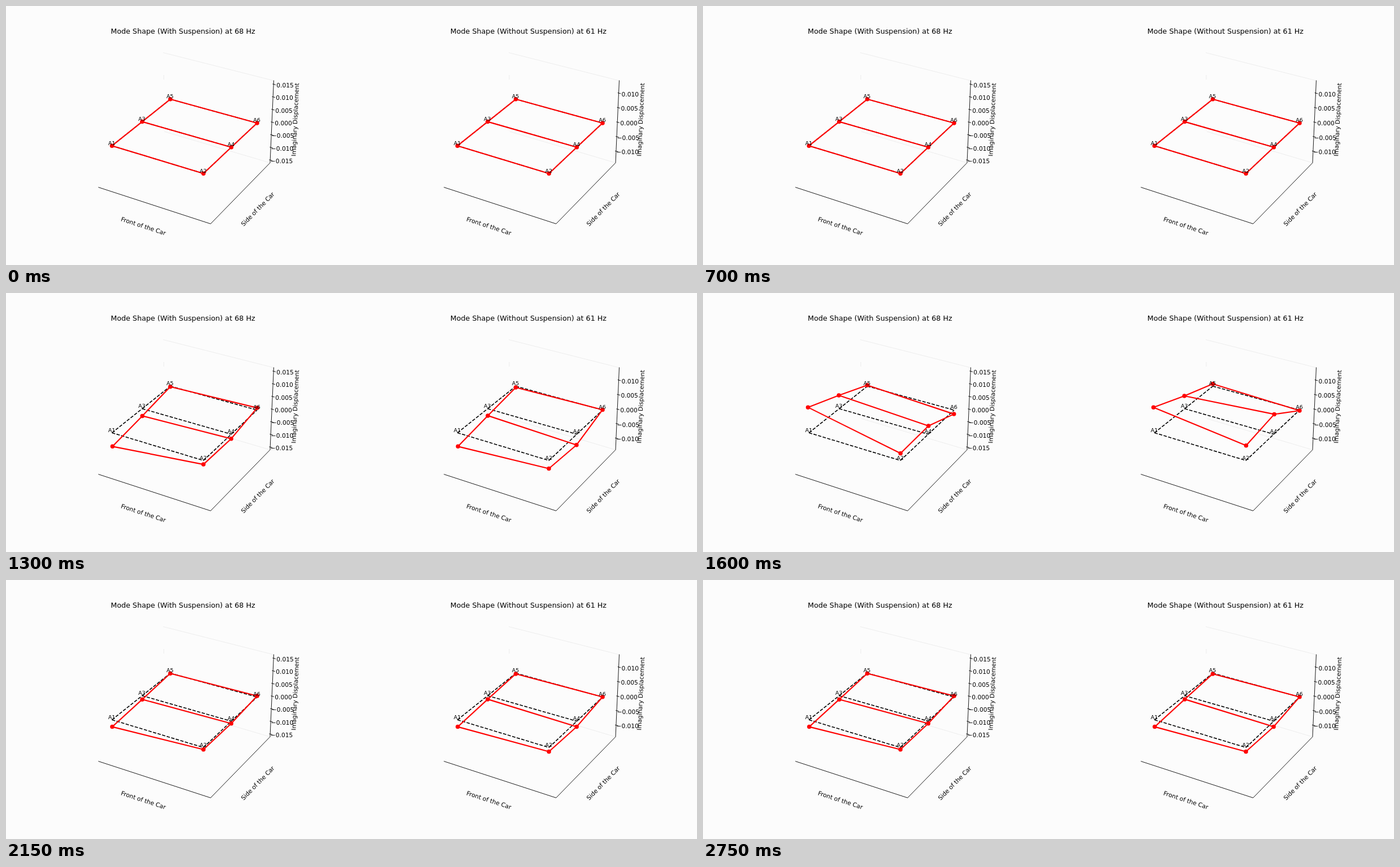
An HTML page for the animation above (2800 ms loop, 1222 by 458 pixels).

```html
<!DOCTYPE html>
<html lang="en">
<head>
<meta charset="utf-8">
<title>Mode shapes</title>
<style>
  html, body { margin: 0; width: 100%; height: 100%; overflow: hidden; background: #fcfcfc; }
  svg { display: block; width: 1222px; height: 458px; }
  text { font-family: "DejaVu Sans", sans-serif; font-size: 10.61px; text-anchor: middle; }
  .title { font-size: 12.73px; }
  .name { font-size: 9.55px; }
  .axis { fill: none; stroke: #000; stroke-width: .9; }
  .pane { fill: none; stroke: #ebebeb; stroke-width: .9; }
  .rest { stroke: #000; stroke-width: 1.6; stroke-dasharray: 5.88 2.54; }
  .shape { fill: none; stroke: #f00; stroke-width: 2.15; stroke-linejoin: round; }
  .dot { fill: #f00; }
</style>
</head>
<body>
<svg id="stage" viewBox="0 0 1222 458"></svg>
<script>
const FRAME_MS = 50, CYCLE = 28;
const VANISH = [317, 3600];
const REST = [[187.4, 247.2], [349.2, 296.2], [240.8, 204.6], [398.4, 249.7], [290.5, 164.8], [444, 207]];
const EDGES = [[0, 1], [2, 3], [4, 5], [0, 2], [2, 4], [1, 3], [3, 5]];
const ROUTE = [0, 1, 3, 2, 0, 2, 4, 5, 3];

// amp: peak rise of each point in pixels
const PANELS = [
  { x: 0, title: "Mode Shape (With Suspension) at 68 Hz", ticks: 3, step: 22.35,
    amp: [59.8, 17, 31.6, 19.8, 2.3, -9.6] },
  { x: 611, title: "Mode Shape (Without Suspension) at 61 Hz", ticks: 2, step: 25.7,
    amp: [59.8, 35.4, 30.3, 47, 5.4, -1.3] }
];

function add(parent, tag, attrs, text) {
  const el = document.createElementNS("http://www.w3.org/2000/svg", tag);
  for (const key in attrs) el.setAttribute(key, attrs[key]);
  if (text) el.textContent = text;
  parent.appendChild(el);
  return el;
}

function label(parent, text, x, y, angle, drop) {
  add(parent, "text", { transform: `translate(${x} ${y}) rotate(${angle})`, y: drop }, text);
}

function drawTicks(g, panel) {
  for (let i = -panel.ticks; i <= panel.ticks; i++) {
    const y = 207 - i * panel.step;
    const axisY = y - 1.6;
    const axisX = 473.5 - (axisY - 132) * 0.0448;
    add(g, "path", { class: "axis", d: `M${axisX - 1.8} ${axisY - 0.5}L${axisX + 3.8} ${axisY + 1}` });
    const value = (i < 0 ? "\u2212" : "") + Math.abs(i * 0.005).toFixed(3);
    label(g, value, 490.5 + (207 - y) * 0.0448, y, 0, 3.9);
  }
}

function build(panel) {
  const g = add(document.getElementById("stage"), "g", { transform: `translate(${panel.x} 0)` });
  add(g, "path", { class: "pane", d: "M278 82.5L473.5 132M279 122V130M279.8 222L467 277.3" });
  add(g, "path", { class: "axis", d: "M163.3 320.5L361.8 385.2L467 277.3L473.5 131.5" });
  drawTicks(g, panel);
  label(g, "Front of the Car", 243, 389, 18, 3.9);
  label(g, "Side of the Car", 445, 359, -45.6, 3.9);
  label(g, "Imaginary Displacement", 512.3, 201, -87.4, 2.9);
  add(g, "text", { class: "title", x: 312.9, y: 49 }, panel.title);

  for (const [a, b] of EDGES) {
    add(g, "line", { class: "rest", x1: REST[a][0], y1: REST[a][1], x2: REST[b][0], y2: REST[b][1] });
  }
  panel.line = add(g, "polyline", { class: "shape" });
  panel.dots = REST.map(() => add(g, "circle", { class: "dot", r: 3.75 }));
  REST.forEach(([x, y], i) => {
    add(g, "text", { class: "name", x: x - 0.4, y: y - 1.6 }, "A" + (i + 1));
  });
}

// A vertical move in space slides the point along its ray from the vanishing point.
function lift([x, y], rise) {
  const k = 1 / (1 - rise / (VANISH[1] - y));
  return [VANISH[0] + (x - VANISH[0]) * k, VANISH[1] + (y - VANISH[1]) * k];
}

// Thirty samples per turn; the twin sample at each extreme is skipped.
function swing(time) {
  const step = Math.floor(time / FRAME_MS) % CYCLE;
  const sample = step + (step > 7) + (step > 21);
  return Math.sin(sample * Math.PI / 15);
}

function render(time) {
  const s = swing(time);
  for (const panel of PANELS) {
    const pts = REST.map((p, i) => lift(p, panel.amp[i] * s));
    panel.line.setAttribute("points", ROUTE.map(i => pts[i].map(v => v.toFixed(2)).join()).join(" "));
    panel.dots.forEach((dot, i) => {
      dot.setAttribute("cx", pts[i][0].toFixed(2));
      dot.setAttribute("cy", pts[i][1].toFixed(2));
    });
  }
}

PANELS.forEach(build);
render(0);
const start = performance.now();
function tick() {
  render(Math.max(0, performance.now() - start));
  requestAnimationFrame(tick);
}
requestAnimationFrame(tick);
</script>
</body>
</html>
```
